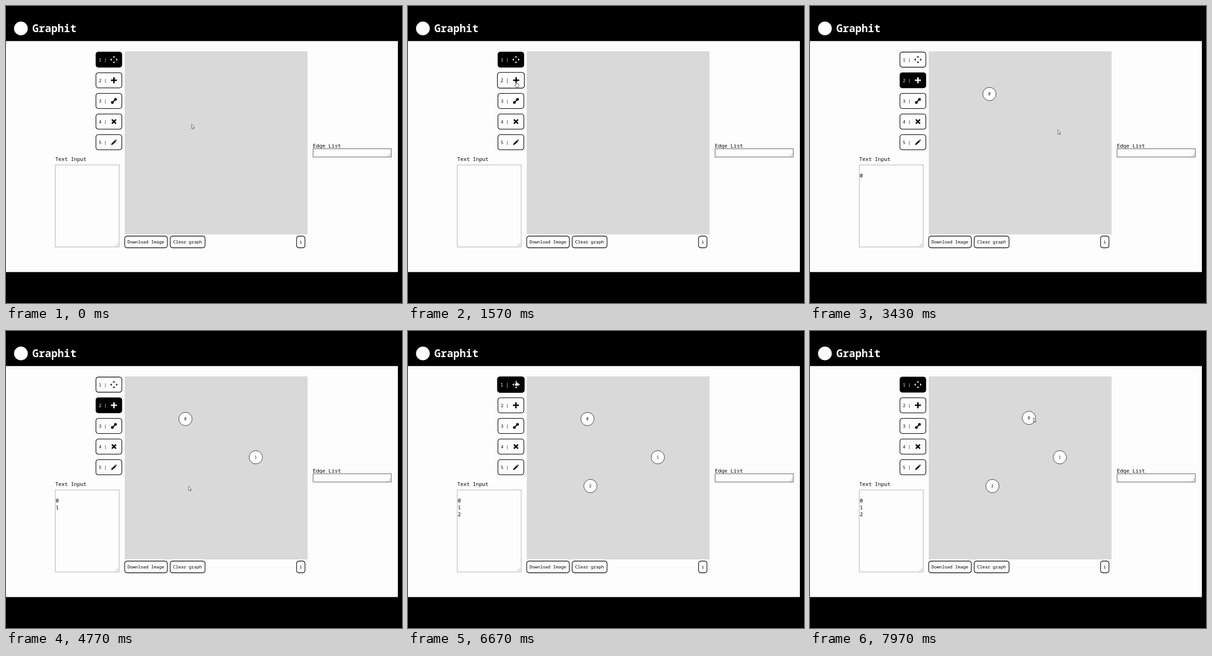
An HTML page that plays this animation: 864 by 648 pixels, repeating every 8000 ms.

```html
<!DOCTYPE html>
<html lang="en">
<head>
<meta charset="utf-8">
<title>Graph editor</title>
<style>
  html, body { margin: 0; width: 100%; height: 100%; overflow: hidden; background: #000; }
  svg { display: block; width: 100vw; height: 100vh; }
  text { font-family: "Noto Sans Mono", "Liberation Mono", monospace; font-size: 11.35px; white-space: pre; }
  .small { font-size: 9.55px; fill: currentColor; }
  .box { fill: #fdfdfd; stroke: #000; stroke-width: 1.3; }
  .tool { color: #000; }
  .tool.active { color: #fff; }
  .tool.active .box { fill: #000; }
  .node circle { fill: #fff; stroke: #222; }
  .node text { font-size: 8px; text-anchor: middle; }
  .grip { stroke: #888; stroke-width: .8; fill: none; }
</style>
</head>
<body>
<svg viewBox="0 0 864 648" preserveAspectRatio="none">
  <rect width="864" height="648"/>
  <circle cx="32.5" cy="49" r="15" fill="#fff"/>
  <text x="57.5" y="57" fill="#fff" style="font-size:22.9px;font-weight:600">Graphit</text>
  <rect y="76.5" width="855" height="504" fill="#fdfdfd"/>
  <rect x="259" y="99" width="399" height="399.5" fill="#d9d9d9"/>

  <g id="tools"></g>
  <g id="buttons"></g>

  <text x="107.5" y="338">Text Input</text>
  <rect x="107.5" y="346.8" width="139.5" height="179" fill="#fdfdfd" stroke="#a6a6b0"/>
  <path class="grip" d="M238.5 524.5l7-7M242 524.5l3.5-3.5"/>
  <g id="lines"></g>

  <text x="669.5" y="309">Edge List</text>
  <rect x="670" y="311.5" width="170.5" height="18" fill="#fdfdfd" stroke="#444"/>
  <path class="grip" d="M832.5 328.5l7-7M836 328.5l3.5-3.5"/>

  <g id="nodes"></g>
  <g id="pointer">
    <path id="arrow" fill="#fff" stroke="#333" stroke-width=".8"
      d="M0 0V9.5L2.2 7.6L3.7 10.8L5 10.2L3.6 7.2H6.3Z"/>
    <path id="hand" fill="#fff" stroke="#222" stroke-width=".8"
      d="M-1 7V.5Q0-.7 1 .5V4.5L4.6 5.6Q5.4 6 5.2 7.5L4.2 12H-1.3L-4 7.8Q-3.6 6.3-2.5 6.8Z"/>
  </g>
</svg>
<script>
const LOOP = 8000;
const $ = id => document.getElementById(id);

const ICONS = [
  '<path d="M0-8l2.7 3.2h-5.4zM0 8l2.7-3.2h-5.4zM-8 0l3.2-2.7v5.4zM8 0l-3.2-2.7v5.4z"/>',
  '<path d="M-6.5 0h13M0-6.5v13" stroke="currentColor" stroke-width="3"/>',
  '<path d="M-3 3L3-3" stroke="currentColor" stroke-width="2.2"/><circle cx="-3.4" cy="3.4" r="2.9"/><circle cx="3.4" cy="-3.4" r="2.9"/>',
  '<path d="M-4.5-4.5l9 9M4.5-4.5l-9 9" stroke="currentColor" stroke-width="3.1"/>',
  '<path d="M-6 6l.8-3.2L2.2-4.2 4.6-1.8-2.8 5.2ZM3-5l1.2-1.2 2.4 2.4L5.4-2.6z"/>'
];
const toolY = i => 117 + 45.05 * i;

$('tools').innerHTML = ICONS.map((icon, i) => `
  <g class="tool">
    <rect class="box" x="-28.2" y="-16.5" width="56.4" height="33" rx="5"/>
    <text class="small" x="-22" y="3.5">${i + 1} |</text>
    <g transform="translate(11)" fill="currentColor">${icon}</g>
  </g>`).join('');

// label, left edge, width, text start
$('buttons').innerHTML = [
  ['Download Image', 259, 93, 265],
  ['Clear graph', 358.3, 76, 364.5],
  ['i', 634, 18.3, 640.2]
].map(([label, x, w, tx]) => `
  <rect class="box" x="${x}" y="502" width="${w}" height="25.5" rx="5"/>
  <text class="small" x="${tx}" y="518">${label}</text>`).join('');

const NODES = [
  { x: 391.5, y: 192, born: 2580 },
  { x: 545, y: 275.5, born: 3680 },
  { x: 398, y: 338.3, born: 4950 }
];
$('nodes').innerHTML = NODES.map((_, i) =>
  `<g class="node"><circle r="14.5"/><text y="3">${i}</text></g>`).join('');
$('lines').innerHTML = NODES.map((_, i) =>
  `<text x="108.5" y="${374.3 + 14.8 * i}">${i}</text>`).join('');

// time, x, y of the pointer tip
const PATH = [
  [0, 405, 258], [600, 405, 258], [1400, 237, 165], [1900, 237, 165],
  [2450, 391, 192], [2750, 391, 192], [3500, 544.5, 272], [3620, 545, 275],
  [3850, 545, 275], [4700, 399, 339], [4850, 398, 338], [5600, 398, 338],
  [6280, 236, 104], [6450, 236, 108], [6750, 236, 108], [7420, 391, 197],
  [7598, 391, 194.5], [8158, 521, 187]
];
const PICKS = [[0, 0], [1750, 1], [6500, 0]];
const GRAB = 7598, LAG = 30;

function pointerAt(t) {
  const k = PATH.findIndex(p => p[0] > t);
  const [t0, x0, y0] = PATH[k - 1], [t1, x1, y1] = PATH[k];
  const u = (t - t0) / (t1 - t0), e = u * u * (3 - 2 * u);
  return [x0 + (x1 - x0) * e, y0 + (y1 - y0) * e];
}

const place = (el, x, y, scale = 1) =>
  el.setAttribute('transform', `translate(${x} ${y}) scale(${scale})`);
const show = (el, on) => el.setAttribute('visibility', on ? 'visible' : 'hidden');

const tools = [...$('tools').children];
const nodes = [...$('nodes').children];
const lines = [...$('lines').children];

function draw() {
  const t = performance.now() % LOOP;
  const [x, y] = pointerAt(t);
  const active = PICKS.filter(p => p[0] <= t).pop()[1];
  let overTool = false;

  tools.forEach((el, i) => {
    const hover = Math.abs(x - 224.5) < 28.5 && Math.abs(y - toolY(i)) < 17;
    overTool ||= hover;
    el.classList.toggle('active', i === active);
    place(el, 224.5, toolY(i), hover ? 1.04 : 1);
  });

  NODES.forEach((n, i) => {
    const dragged = i === 0 && t > GRAB + LAG;
    place(nodes[i], ...(dragged ? pointerAt(t - LAG) : [n.x, n.y]));
    show(nodes[i], t >= n.born);
    show(lines[i], t >= n.born);
  });

  place($('pointer'), x, y);
  show($('hand'), overTool);
  show($('arrow'), !overTool);
  requestAnimationFrame(draw);
}
draw();
</script>
</body>
</html>
```
